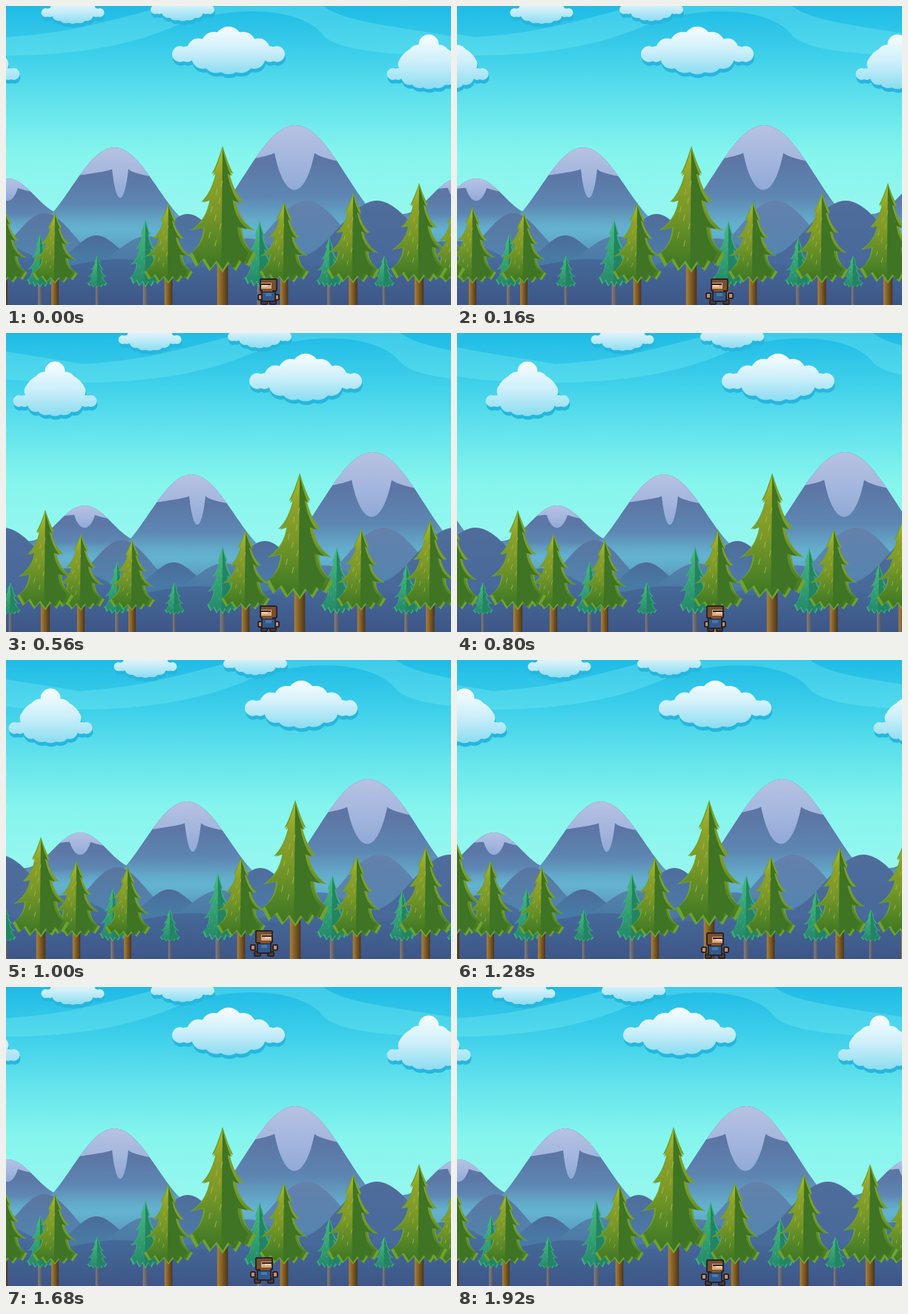
Recreate the animation shown at these times as an HTML page with a canvas. Size 600 by 404 pixels, loop 1960 ms.

```html
<!DOCTYPE html>
<html lang="en">
<head>
<meta charset="utf-8">
<title>Forest walk</title>
<style>
html, body { margin: 0; width: 100%; height: 100%; overflow: hidden; background: #3d5687; }
canvas { display: block; }
</style>
</head>
<body>
<canvas id="stage" width="600" height="404"></canvas>
<script>
const H = 404, TILE = 608, STEP = 40, FRAMES = 49;
const stage = document.getElementById('stage').getContext('2d');
const tile = document.createElement('canvas');
tile.width = TILE;
tile.height = H;
const c = tile.getContext('2d');

function gradient(x0, y0, x1, y1, colors) {
  const g = c.createLinearGradient(x0, y0, x1, y1);
  colors.forEach((color, i) => g.addColorStop(i / (colors.length - 1), color));
  return g;
}
const vertical = (top, bottom, ...colors) => gradient(0, top, 0, bottom, colors);

function fill(path, style) {
  c.fillStyle = style;
  c.fill(path);
}

// Draws a part so that it continues across the seam of the tile.
function wrap(draw) {
  for (const dx of [-TILE, 0, TILE]) {
    c.save();
    c.translate(dx, 0);
    draw();
    c.restore();
  }
}

// Two rows of puffs, largest in the middle, around a solid core.
function cloud(x, y, w, lift) {
  const path = new Path2D();
  const puff = (px, py, rx, ry = rx) => {
    path.moveTo(px + rx, py);
    path.ellipse(px, py, rx, ry, 0, 0, 7);
  };
  puff(x, y - lift * .3, w * .36, lift / 2 + 8);
  for (let t = -1; t < 1.01; t += 1 / 3) {
    const bulge = 1 - t * t, r = w * (.07 + .05 * bulge), px = t * (w / 2 - r);
    puff(x + px, y - lift * (1 - Math.abs(t)), r);
    puff(x + px * .85, y + w * .06 * bulge, r);
  }
  wrap(() => {
    c.translate(1, 5);
    fill(path, '#26b6de');
    c.translate(-1, -5);
    fill(path, vertical(y - lift - w * .12, y + w * .18, '#f8fdff', '#cdeffa', '#8adcf1'));
  });
}

// A cosine bell standing on y = top + h, filled down to the bottom edge.
function bell(x, top, h, half) {
  const path = new Path2D();
  path.moveTo(x - half, H);
  for (let t = -1; t < 1.01; t += .04) {
    path.lineTo(x + t * half, top + h * Math.sin(t * Math.PI / 2) ** 2);
  }
  path.lineTo(x + half, H);
  return path;
}

// The snow cap has one tongue, centred at x + shift.
function mountain(x, top, h, half, shift, width) {
  const shape = bell(x, top, h, half), mid = x + shift, low = top + h * .37, notch = top + h * .27;
  const snow = new Path2D(
    `M${x - half} ${top}V${low + 6}Q${mid - width * 1.5} ${low - 6} ${mid - width} ${notch}` +
    `C${mid - width * .5} ${top + h * .75} ${mid + width * .5} ${top + h * .75} ${mid + width} ${notch}` +
    `Q${mid + width * 1.5} ${low - 2} ${x + half} ${low + 10}V${top}Z`);
  wrap(() => {
    fill(shape, vertical(top, 305, '#5e76a6', '#5c76a5', '#5d86b2', '#66bbd5'));
    c.clip(shape);
    fill(snow, vertical(top, top + h * .65, '#b6c2e2', '#a5b7de', '#8ea9d6'));
  });
}

function hill(x, top, h, half, from, to) {
  wrap(() => fill(bell(x, top, h, half), vertical(top, top + h, from, to)));
}

// One side of a fir in a 200 by 100 box: four drooping tiers, then a toothed hem.
function firHalf(side) {
  const path = new Path2D('M0 0');
  for (let k = 1; k < 5; k++) {
    const x = side * Math.min(100, 27 * k), y = 22 * k;
    path.quadraticCurveTo(x * .5, y - 8, x, y);
    if (k < 4) path.lineTo(x * .6, y - 2);
  }
  for (let i = 1; i < 7; i++) {
    const t = 1 - i / 6;
    path.lineTo(side * 100 * t, 89 + 10 * (1 - t * t) - i % 2 * 7);
  }
  path.lineTo(-side * 4, 93);
  return path;
}
const [firLeft, firRight] = [-1, 1].map(firHalf);

function fir(style) {
  fill(firLeft, style);
  fill(firRight, style);
}

const kinds = {
  pine: {
    rim: '#6ea32e', shade: '#3e7423', dash: '#a9b945', bottom: 376, spread: h => 14 + .23 * h,
    leaf: ['#aaba30', '#8da029', '#7b9827', '#588827', '#3c7423'], bark: ['#ab803a', '#7d5a25', '#4b3619']
  },
  teal: {
    rim: '#3fb07c', shade: '#238463', dash: '#56bd88', bottom: 381, spread: h => 8 + .18 * h,
    leaf: ['#48ba7e', '#34a273', '#23876a'], bark: ['#86817c', '#69686f', '#4f5568']
  }
};

function tree(kind, x, top) {
  const k = kinds[kind], h = Math.min(173, k.bottom - top), half = k.spread(h), trunk = half * .27;
  wrap(() => {
    c.fillStyle = gradient(x - trunk / 2, 0, x + trunk / 2, 0, k.bark);
    c.fillRect(x - trunk / 2, top + h * .85, trunk, H);
    c.translate(x, top);
    c.scale(half / 100, h / 100);
    fir(k.rim);
    c.translate(0, 2.5);
    c.scale(.91, .95);
    fir(vertical(0, 100, ...k.leaf));
    c.save();
    c.scale(.85, 1);
    fill(firRight, k.shade);
    c.restore();
    c.strokeStyle = k.dash;
    c.lineWidth = 1.5;
    c.beginPath();
    for (let i = 0; i < 8; i++) {
      const y = 26 + i * 7, x = -y * .7 * (i * .618 % 1);
      c.moveTo(x, y);
      c.lineTo(x - 4, y + 5);
    }
    c.stroke();
  });
}

function paintTile() {
  c.fillStyle = vertical(0, 270, '#1fbbe6', '#3fd0ea', '#65e4ec', '#86f5ed', '#93f7ee');
  c.fillRect(0, 0, TILE, H);
  fill(new Path2D('M0 42C80 38 140 20 215 0H428C455 22 530 28 608 42V67' +
    'C530 67 455 62 430 42C405 5 320 -5 235 24C170 54 90 67 0 67Z'), 'rgba(120,235,240,.34)');

  cloud(90, 9, 85, 12);
  cloud(238, 5, 86, 12);
  cloud(300, 65, 152, 19);
  cloud(570, 92, 113, 40);

  mountain(2, 233, 48, 75, 0, 14);
  mountain(146, 191, 108, 116, 8, 11);
  mountain(390, 161, 139, 140, -1, 27);

  c.fillStyle = vertical(285, 340, 'rgba(98,180,208,0)', '#5689b2');
  c.fillRect(0, 285, TILE, H);
  hill(245, 281, 50, 70, '#4f6d9b', '#4c79a6');
  hill(405, 263, 75, 100, '#6481ab', '#5385b0');
  hill(500, 263, 75, 105, '#506d9b', '#48699a');
  hill(52, 280, 60, 80, '#5a759f', '#5085af');
  hill(122, 310, 30, 55, '#4d6b99', '#477aa5');
  hill(190, 311, 35, 75, '#5583ab', '#4979a5');
  hill(325, 314, 36, 90, '#5380aa', '#466c9b');
  hill(590, 318, 30, 90, '#4d77a5', '#45699a');

  const ground = new Path2D(`M0 ${H}`);
  for (let x = 0; x <= TILE; x += 8) ground.lineTo(x, 348 + 6 * Math.sin(x / TILE * Math.PI * 6));
  ground.lineTo(TILE, H);
  fill(ground, vertical(340, H, '#456a9a', '#3d5687'));

  const teals = [[46, 308], [123, 337], [188, 288], [342, 290], [436, 312], [510, 337]];
  const pines = [[605, 271], [66, 279], [219, 266], [375, 264], [468, 252], [557, 239], [292, 189]];
  teals.forEach(([x, top]) => tree('teal', x, top));
  pines.forEach(([x, top]) => tree('pine', x, top));
}

// The walker faces right here and is mirrored when walking left.
function walker(x, y, left, spread) {
  const box = (color, bx, by, w, h) => {
    stage.fillStyle = color;
    stage.fillRect(bx, by, w, h);
  };
  const part = (color, bx, by, w, h) => {
    box('#2b2327', bx - 1, by - 2, w + 2, h + 4);
    box('#2b2327', bx - 2, by - 1, w + 4, h + 2);
    box(color, bx, by, w, h);
  };
  const reach = spread ? 15 : 11, stride = spread ? 9 : 6;
  stage.save();
  stage.translate(x, y);
  if (left) stage.scale(-1, 1);
  for (const side of [-1, 1]) {
    part('#4d3c38', side * stride - 3, 31, 6, 4);
    part('#c98f68', side * reach - 2, spread ? 22 : 24, 4, 5);
  }
  part('#31598a', -8, 20, 16, 11);
  part('#76502f', -10, 3, 20, 14);
  box('#e0aa7c', -4, 7, 14, 8);
  box('#2b2327', -3, 8, 13, 2);
  box('#f6d9b4', 1, 10, 8, 2);
  box('#7c5433', -5, 15, 13, 4);
  box('#4479ad', -4, 21, 8, 4);
  stage.restore();
}

function draw(now) {
  const frame = Math.floor(now / STEP) % FRAMES;
  const left = frame < 19;
  const shift = Math.round(left ? 8 * Math.max(0, frame - 1) : Math.max(0, 98 - 7.08 * (frame - 25)));
  stage.drawImage(tile, shift - TILE, 0);
  stage.drawImage(tile, shift, 0);

  const phase = (frame + (left ? 3 : 4)) % 8;
  const hop = phase === 5 || phase === 6 ? 3 : 0;
  walker(left ? 354 : 348, 367 - hop, left, phase > 3);
}

paintTile();
const start = performance.now();
function loop() {
  draw(performance.now() - start);
  requestAnimationFrame(loop);
}
loop();
</script>
</body>
</html>
```
